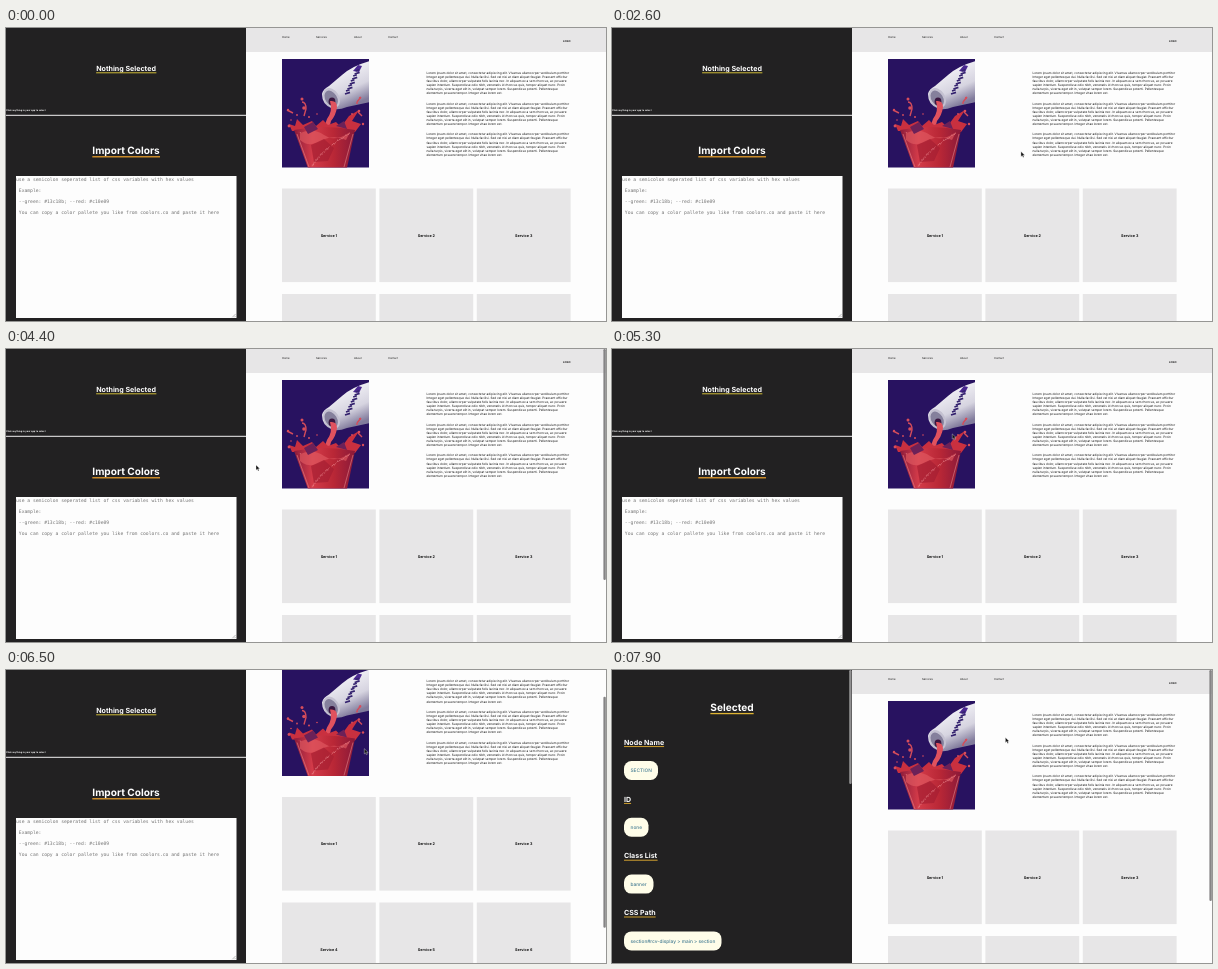
These frames come from a looping animation (600 px wide and 293 px high, 8000 ms). An HTML page:

```html
<!DOCTYPE html>
<html lang="en">
<head>
<meta charset="utf-8">
<title>Page inspector</title>
<style>
  html, body { margin: 0; width: 100%; height: 100%; overflow: hidden; background: #fdfdfd; }
  svg { display: block; width: 600px; height: 293px; text-rendering: geometricPrecision; }
  text { font-family: Inter, Roboto, sans-serif; white-space: pre; }
  .bold { font-weight: 700; }
  .mono { font-family: "DejaVu Sans Mono", monospace; font-size: 4.69px; fill: #747474; }
</style>
</head>
<body>
<svg id="stage" viewBox="0 0 600 293">
  <defs>
    <linearGradient id="can" x1="0" y1="0" x2=".45" y2="1">
      <stop offset="0" stop-color="#aaa6bc"/>
      <stop offset=".35" stop-color="#eeedf3"/>
      <stop offset=".7" stop-color="#d6d4e0"/>
      <stop offset="1" stop-color="#817b9c"/>
    </linearGradient>
    <linearGradient id="drink" x1="0" x2="1">
      <stop offset="0" stop-color="#8d1c3b"/>
      <stop offset=".3" stop-color="#d33b49"/>
      <stop offset=".65" stop-color="#b92736"/>
      <stop offset="1" stop-color="#8a1939"/>
    </linearGradient>
    <clipPath id="photoBox"><rect x="276" y="31" width="87" height="108.5"/></clipPath>
  </defs>

  <g id="page">
    <rect x="240" width="360" height="24" fill="#e7e6e7"/>
    <g clip-path="url(#photoBox)">
      <rect x="276" y="31" width="87" height="109" fill="#281260"/>
      <!-- can -->
      <path d="M316 66Q317 61 323 58L336 47Q346 38 364 33V74L341 79Q331 83 325 80Q316 76 316 66Z" fill="url(#can)"/>
      <ellipse cx="325.5" cy="70" rx="7.6" ry="10.6" transform="rotate(-32 325.5 70)" fill="#c4c1d1"/>
      <ellipse cx="325.2" cy="70.5" rx="5.8" ry="8.6" transform="rotate(-32 325.2 70.5)" fill="#85809c"/>
      <ellipse cx="326" cy="73.5" rx="3.4" ry="4" fill="#3a1741"/>
      <path d="M347 43l5-6 4 1-3 6z" fill="#4a2790"/>
      <g id="label" stroke="#35236f" stroke-width="1.7"></g>
      <!-- pour and splash -->
      <path d="M324 73Q331 72 331 79Q330 87 325 93L322 105H316L321 91Q327 83 324 73Z" fill="#e0525e"/>
      <path d="M286 103L283 96L289 98L291 91L297 97L306 93L310 98L317 92L322 97L330 94L335 99L343 88L353 82L346 93L355 96L349 104Z" fill="#c9303f"/>
      <path d="M288 102Q318 96 349 102L341 140H302Z" fill="url(#drink)"/>
      <path d="M294 105Q307 99 318 107T344 104L340 112Q327 106 315 113T294 112Z" fill="#e15a62" opacity=".65"/>
      <path d="M298 99L307 94L312 101L302 106Z M330 98L338 93L341 101Z" fill="#6c2158"/>
      <path d="M305 117L318 111L328 120L322 133L308 134Z" fill="#a61f32" opacity=".7"/>
      <path d="M291 106L303 139M347 106L338 139" stroke="#e78a91" stroke-width=".8" fill="none" opacity=".7"/>
      <path d="M296 74Q300 74 300 81L298 88M281 82l6 3M351 74l4 -5M352 84l4 4" stroke="#d34b5a" stroke-width="1.4" fill="none"/>
      <g id="drops" fill="#d84d5b"></g>
      <g id="fizz" fill="#ee8f94" opacity=".7"></g>
    </g>
  </g>

  <g id="panel"><rect width="240" height="293" fill="#222122"/></g>
  <rect id="pageBar" x="597.4" width="2.4" height="231" rx="1.2" fill="#858485"/>
  <path id="cursor" d="M0 0V5.2L1.3 4.1L2.1 6L3.1 5.5L2.3 3.8H3.9Z" fill="#111" stroke="#fff" stroke-width=".35"/>
</svg>
<script>
const $ = id => document.getElementById(id);

function add(parent, tag, attrs, content) {
  const el = document.createElementNS("http://www.w3.org/2000/svg", tag);
  for (const key in attrs) el.setAttribute(key, attrs[key]);
  if (content) el.textContent = content;
  parent.appendChild(el);
  return el;
}
const rect = (parent, x, y, width, height, fill, rx = 0) =>
  add(parent, "rect", { x, y, width, height, fill, rx });
const label = (parent, x, y, size, content, extra) =>
  add(parent, "text", { x, y, "font-size": size, fill: "#141414", ...extra }, content);

// Page
const page = $("page");
[[276, "Home"], [310, "Services"], [348, "About"], [382, "Contact"]]
  .forEach(([x, name]) => label(page, x, 9.7, 2.7, name));
label(page, 564.6, 13.5, 2.65, "LOGO", { class: "bold", "text-anchor": "end" });

const lorem = [
  "Lorem ipsum dolor sit amet, consectetur adipiscing elit. Vivamus ullamcorper vestibulum porttitor",
  "Integer eget pellentesque dui. Nulla facilisi. Sed vel nisi at diam aliquet feugiat. Praesent efficitur",
  "faucibus dolor, ullamcorper vulputate felis lacinia nec. In aliquam ex a sem rhoncus, ac posuere",
  "sapien interdum. Suspendisse odio nibh, venenatis id rhoncus quis, tempor aliquet nunc. Proin",
  "nulla turpis, viverra eget elit in, volutpat semper lorem. Suspendisse potenti. Pellentesque",
  "elementum posuere tempor. Integer vitae lorem est."
];
for (let p = 0; p < 3; p++)
  lorem.forEach((line, i) => label(page, 420.5, 45.6 + p * 30.9 + i * 4.08, 3.11, line));

for (let i = 0; i < 6; i++) {
  const x = 276 + (i % 3) * 97.4, y = 160.5 + Math.floor(i / 3) * 105.5;
  rect(page, x, y, 93.8, 93.6, "#e7e6e7");
  label(page, x + 46.9, y + 48.4, 3.75, "Service " + (i + 1), { class: "bold", "text-anchor": "middle" });
}

// Photo details
for (let i = 0; i < 5; i++)
  add($("label"), "path", { d: `M${339 + i * 2.4} ${66 - i * 5}l5 -1.6m-4 -1.4l3.6 -1.2` });
[[296, 71, 1.5], [298, 80, 1.8], [282, 82, 1.2], [285, 92, .8], [283, 98, 1.4], [291, 87, .9], [303, 89, 1],
 [354, 70, 1.2], [351, 75, .9], [353, 83, 1.3], [357, 96, 1.2], [346, 86, .9], [311, 86, .8]]
  .forEach(([cx, cy, r]) => add($("drops"), "circle", { cx, cy, r }));
for (let i = 0; i < 46; i++) {
  const v = (i * 0.618) % 1, u = (i * 0.383) % 1;
  add($("fizz"), "circle", { cx: 293 + v * 12 + u * (52 - v * 22), cy: 104 + v * 35, r: .35 + (i % 3) * .15 });
}

// Side panel
const panel = $("panel");
const idle = add(panel, "g", {}), details = add(panel, "g", {});

function heading(parent, x, y, size, content, line, centred) {
  const el = label(parent, x, y, size, content,
    { class: "bold", fill: "#fff", "text-anchor": centred ? "middle" : "start" });
  const box = el.getBBox();
  rect(parent, box.x, y + size * .19, box.width, size * .13, line);
}

heading(idle, 120, 43, 7.1, "Nothing Selected", "#d9c638", true);
label(idle, 0, 83.1, 2.32, "Click anything in your app to select", { class: "bold", fill: "#fff" });
rect(idle, 0, 86.8, 240, 1, "#f1f1f1");
heading(idle, 120, 126.2, 10.1, "Import Colors", "#df982b", true);
rect(idle, 10, 148, 220.5, 142, "#fdfdfd");
["use a semicolon seperated list of css variables with hex values",
 " Example:",
 " --green: #13c18b; --red: #c10e09",
 " You can copy a color pallete you like from coolors.co and paste it here"]
  .forEach((line, i) => add(idle, "text", { x: 10, y: 153.2 + i * 11, class: "mono" }, line));
add(idle, "path", { d: "M226.3 289.3l3.4 -3.4M228.3 289.3l1.4 -1.4", stroke: "#777", "stroke-width": .5 });

heading(details, 120, 41, 10.1, "Selected", "#dfb433", true);
[["Node Name", "SECTION", 34], ["ID", "none", 24.5], ["Class List", "banner", 29.5],
 ["CSS Path", "section#rcv-display > main > section", 97.5]]
  .forEach(([name, value, width], i) => {
    const y = i * 56.8;
    heading(details, 12, y + 74.8, 7.05, name, "#dda92f");
    rect(details, 12, y + 91, width, 19, "#fffde9", 7.5);
    label(details, 18.5, y + 102.3, 4.8, value, { fill: "#437b92", "font-weight": 500 });
  });
rect(details, 237.2, 0, 2.4, 114, "#929192", 1.2);

// Motion: [time, values...]
const LOOP = 8000, STEP = 100, SELECT_AT = 7700, CURSOR_AT = 1200;
const cursorKeys = [[0, 586.8, 128.5], [2200, 586.8, 128.5], [2800, 320, 121], [3300, 250, 116],
  [4800, 250, 116], [5400, 358.3, 78.7], [7100, 358.3, 78.7], [7500, 393.4, 67.5]];
const scrollKeys = [[0, 0], [5500, 0], [5800, 54], [6000, 78], [6200, 78], [6500, 33.5], [6900, 0]];
const barKeys = [[0, 0], [4100, 0], [4200, 1], [4700, 1], [5000, 0], [5500, 0], [5600, 1]];

function at(keys, t) {
  const n = keys.findIndex(k => k[0] > t);
  if (n < 0) return keys[keys.length - 1].slice(1);
  const a = keys[n - 1], b = keys[n], f = (t - a[0]) / (b[0] - a[0]);
  return a.slice(1).map((v, i) => v + (b[i + 1] - v) * f);
}

function draw(t) {
  const [scroll] = at(scrollKeys, t), [x, y] = at(cursorKeys, t);
  page.setAttribute("transform", `translate(0 ${-scroll})`);
  $("pageBar").setAttribute("y", scroll * 62 / 78);
  $("pageBar").setAttribute("opacity", at(barKeys, t)[0]);
  $("cursor").setAttribute("transform", `translate(${x} ${y})`);
  $("cursor").setAttribute("visibility", t < CURSOR_AT ? "hidden" : "visible");
  idle.setAttribute("visibility", t < SELECT_AT ? "visible" : "hidden");
  details.setAttribute("visibility", t < SELECT_AT ? "hidden" : "visible");
}

const start = performance.now();
function tick() {
  const t = (performance.now() - start) % LOOP;
  draw(Math.floor(t / STEP) * STEP);
  requestAnimationFrame(tick);
}
tick();
</script>
</body>
</html>
```
